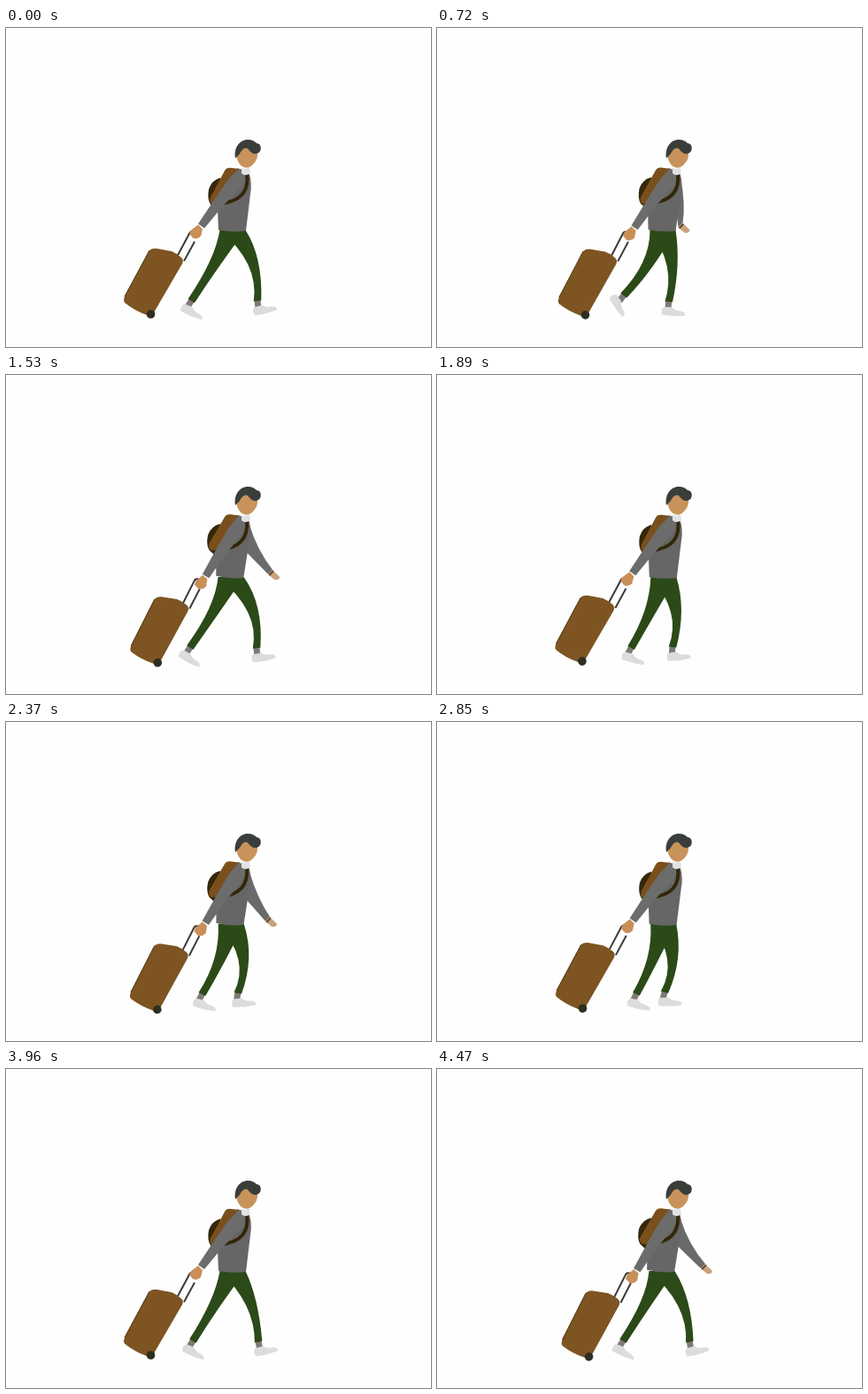
An HTML page with a canvas for the animation above (4.5 s loop, 480 by 360 pixels).

```html
<!DOCTYPE html>
<html lang="en">
<head>
<meta charset="utf-8">
<title>Traveller walking</title>
<style>
html, body { margin: 0; width: 100%; height: 100%; overflow: hidden; background: #fefefe; }
canvas { display: block; }
</style>
</head>
<body>
<canvas id="stage" width="480" height="360"></canvas>
<script>
const ctx = document.getElementById('stage').getContext('2d');
const LOOP = 4500, STRIDE = 1000, STEP = 30;
const RAD = Math.PI / 180;

// One stride of a leg: phase in ms, knee x y, ankle x y, foot angle
const STRIDE_KEYS = [
  [0, 279, 265, 284, 308, -14],
  [100, 276, 267, 279, 309, -4],
  [210, 267, 268, 264, 309, 2],
  [350, 243, 269, 225, 307, 12],
  [400, 239, 269, 218, 308, 16],
  [470, 235, 266, 210, 307, 23],
  [510, 235, 267, 209, 308, 24],
  [600, 232, 266, 204, 305, 41],
  [710, 236, 267, 209, 302, 56],
  [780, 253, 269, 230, 302, 30],
  [850, 266, 267, 257, 305, -2],
  [890, 270, 267, 266, 307, -7],
  [950, 276, 265, 284, 308, -14]
];

const SHAPES = Object.fromEntries(Object.entries({
  hair: 'M259 147C257 135 264 126 273 126C278 126 281 128 283 130C289 130 289 139 285 141C280 144 276 140 273 136C269 134 266 138 264 142Z',
  face: 'M260 141Q264 133 273 133Q279 140 284 140Q285 148 279 154Q272 161 265 155Q260 149 260 141Z',
  collar: 'M266 158Q271 160 275 157L276 164Q270 168 266 164Z',
  torso: 'M262 158L269 163L275 165Q278 176 276 187L271 229Q255 231 240 228L239 204L246 182Z',
  pocket: 'M242 169Q232 172 229 182Q227 193 231 199L240 207L246 185Z',
  pack: 'M247 161Q249 157 255 158L264 159L256 181L245 199L233 199Q229 196 231 191Z',
  sleeve: 'M263 159Q270 159 270 168Q270 176 262 183L244 202L224 226L217 221L235 194L251 171Z',
  hand: 'M217 222L222 227L220 235Q216 239 211 237L207 232L209 228Z',
  bag: 'M162 251Q165 248 171 249L187 252Q194 255 198 259Q201 262 199 266L167 321Q164 326 159 324Q145 319 134 310Q132 308 134 303Z',
  sole: 'M-7 15Q-9 8 -5 6L4 6Q7 10 14 10Q20 11 19 15Q6 17 -7 15Z'
}).map(([name, d]) => [name, new Path2D(d)]));

function fill(path, color) {
  ctx.fillStyle = color;
  ctx.fill(path);
}

function stroke(d, color, width) {
  ctx.strokeStyle = color;
  ctx.lineWidth = width;
  ctx.stroke(new Path2D(d));
}

function pivot(x, y, degrees, draw) {
  ctx.save();
  ctx.translate(x, y);
  ctx.rotate(degrees * RAD);
  ctx.translate(-x, -y);
  draw();
  ctx.restore();
}

// Smooth periodic interpolation through the stride keys
function legPose(phase) {
  const n = STRIDE_KEYS.length;
  const key = i => {
    const wrap = Math.floor(i / n), k = STRIDE_KEYS[i - wrap * n];
    return [k[0] + wrap * STRIDE, ...k.slice(1)];
  };
  let i = n - 1;
  while (STRIDE_KEYS[i][0] > phase) i--;
  const [a, b, c, d] = [i - 1, i, i + 1, i + 2].map(key);
  const span = c[0] - b[0], u = (phase - b[0]) / span;
  return [1, 2, 3, 4, 5].map(j => {
    const m0 = (c[j] - a[j]) / (c[0] - a[0]) * span;
    const m1 = (d[j] - b[j]) / (d[0] - b[0]) * span;
    const rise = c[j] - b[j];
    return b[j] + u * (m0 + u * (3 * rise - 2 * m0 - m1 + u * (m0 + m1 - 2 * rise)));
  });
}

function drawLeg(phase, hipShift) {
  const [kx, ky, ax, ay, foot] = legPose(phase);
  const hx = 256 - hipShift, hy = 228;
  const shin = Math.atan2(ay - ky, ax - kx);

  ctx.save();
  ctx.translate(ax, ay);
  ctx.save();
  ctx.rotate(shin - Math.PI / 2);
  ctx.fillStyle = '#7f7a76';
  ctx.fillRect(-3.5, -2, 7, 10);
  ctx.restore();
  ctx.rotate(foot * RAD);
  fill(SHAPES.sole, '#dcdcdc');
  ctx.restore();

  const axis = Math.atan2(ay - hy, ax - hx);
  const side = sign => {
    const knee = [kx + sign * 6 * Math.sin(axis), ky - sign * 6 * Math.cos(axis)];
    const ankle = [ax + sign * 4.3 * Math.sin(shin), ay - sign * 4.3 * Math.cos(shin)];
    const hip = [hx + sign * 14.5, hy];
    const bend = knee.map((v, i) => 2 * v - (hip[i] + ankle[i]) / 2);
    return { hip, bend, ankle };
  };
  const left = side(-1), right = side(1);
  ctx.beginPath();
  ctx.moveTo(...left.hip);
  ctx.quadraticCurveTo(...left.bend, ...left.ankle);
  ctx.lineTo(...right.ankle);
  ctx.quadraticCurveTo(...right.bend, ...right.hip);
  ctx.fillStyle = '#2b4a18';
  ctx.fill();
}

function drawFarArm(swing) {
  const x = 250 + 51 * swing, y = 222;
  fill(new Path2D(`M266 168L275 169Q${278 + 6 * swing} 198 ${x + 2} ${y - 2}L${x - 3} ${y + 3}Q${262 + 20 * swing} 210 262 190Z`), '#6a6a6a');
  fill(new Path2D(`M${x} ${y - 1}L${x + 5} ${y + 1}L${x + 10} ${y + 6}Q${x + 9} ${y + 10} ${x + 4} ${y + 9}L${x - 2} ${y + 4}Z`), '#c9a07c');
  stroke(`M${x + 3} ${y - 1}L${x - 2} ${y + 4}`, '#55432c', 1.8);
}

function drawSuitcase(swing) {
  ctx.save();
  ctx.translate(5.7 * swing, 0.5 * swing);
  pivot(211, 232, -1.5 * swing, () => {
    stroke('M192 260L207 232Q208 229 212 230L215 231M201 263L213 241', '#3c3c38', 2);
    fill(SHAPES.bag, '#7d5422');
    stroke('M134 303L162 251', '#54390f', 1);
    ctx.beginPath();
    ctx.arc(163.5, 323, 4.8, 0, 7);
    ctx.fillStyle = '#2c2e20';
    ctx.fill();
  });
  ctx.restore();
}

function draw(t) {
  const phase = t % STRIDE;
  const swing = (1 + Math.cos((phase - 470) / STRIDE * 2 * Math.PI)) / 2;

  ctx.fillStyle = '#fefefe';
  ctx.fillRect(0, 0, 480, 360);
  drawFarArm(swing);
  drawLeg((phase + STRIDE / 2) % STRIDE, 2 * swing);
  drawLeg(phase, 2 * swing);
  drawSuitcase(swing);

  pivot(268, 160, 2.4 * swing, () => {
    fill(SHAPES.pocket, '#35270b');
    fill(SHAPES.torso, '#666');
    fill(SHAPES.pack, '#7a4f1c');
    stroke('M272 164C275 184 265 196 242 198', '#33260a', 4);
  });
  pivot(264, 165, -5 * swing, () => {
    fill(SHAPES.hand, '#c98f58');
    fill(SHAPES.sleeve, '#6c6c6c');
  });

  fill(SHAPES.collar, '#e2e2e4');
  fill(SHAPES.face, '#c8935a');
  fill(SHAPES.hair, '#3a3e3b');
}

function tick() {
  const t = performance.now() % LOOP;
  draw(Math.floor(t / STEP) * STEP);
  requestAnimationFrame(tick);
}
tick();
</script>
</body>
</html>
```
